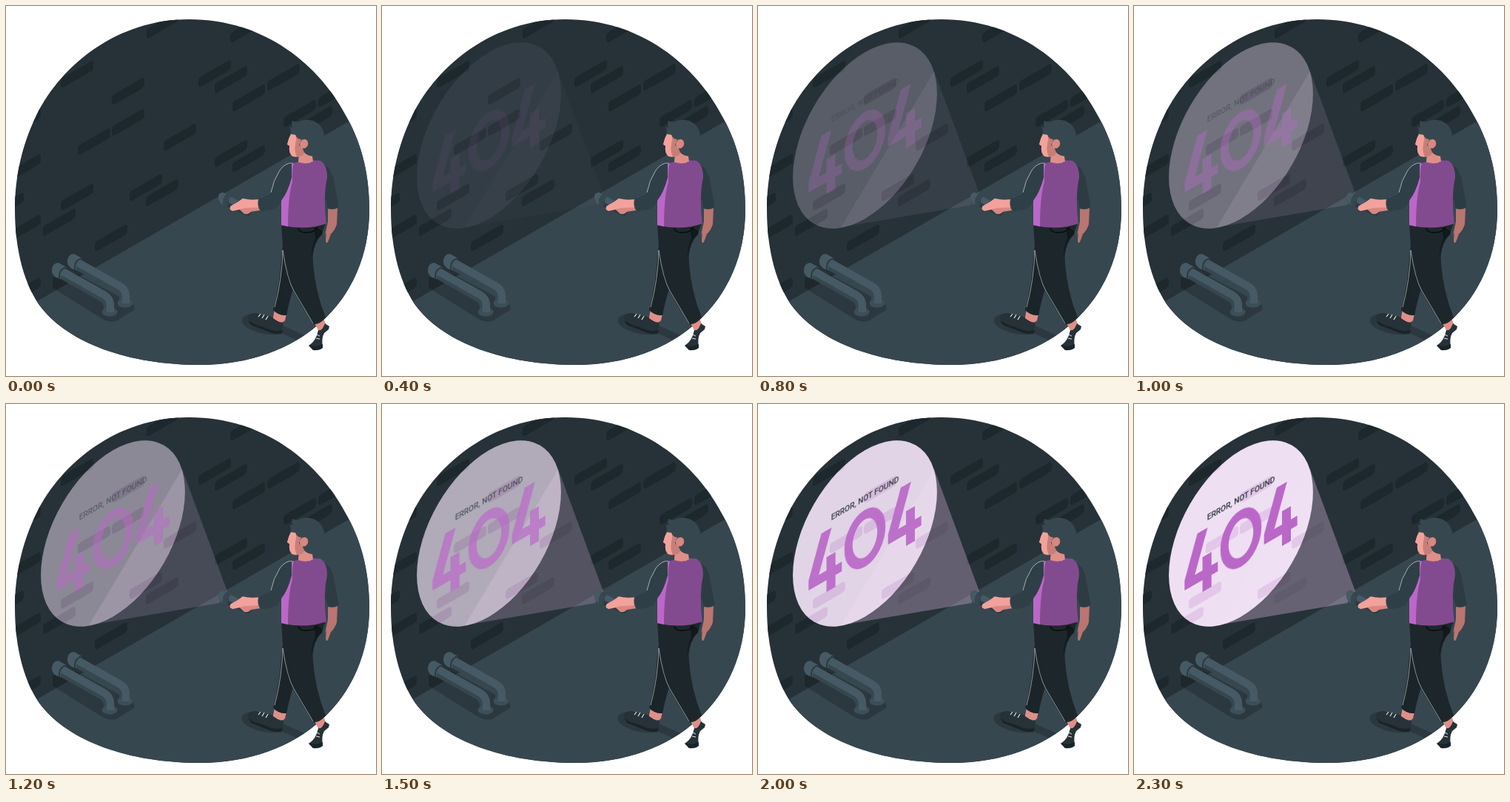
These frames come from a looping animation (500x500 px, 2400 ms). An HTML page:

```html
<!DOCTYPE html>
<html lang="en">
<head>
<meta charset="utf-8">
<title>Error, not found</title>
<style>
html, body { margin: 0; width: 100%; height: 100%; overflow: hidden; background: #fff; }
svg { display: block; width: 100%; height: 100%; }
text { font: 500 11.7px Roboto, Arial, sans-serif; }
</style>
</head>
<body>
<svg viewBox="0 0 500 500">
  <defs>
    <clipPath id="blob"><path d="M247 18C150 18 75 80 42 146C20 190 12 235 12 275C12 330 25 378 48 408C85 455 165 485 262 485C395 485 491 400 491 275C491 230 482 190 462 153C425 80 350 18 247 18Z"/></clipPath>
    <clipPath id="spot"><circle r="112.5" transform="matrix(.866 -.5 0 1 144.5 175)"/></clipPath>
    <g id="bricks"></g>
    <g id="pipe" fill="none" stroke-linejoin="round">
      <path d="M74 361L131 393Q139 398 139 406V415" stroke="#37474f" stroke-width="14"/>
      <ellipse cx="140" cy="416" rx="10.500" ry="6" fill="#2c3a41"/>
      <ellipse cx="140" cy="413.500" rx="10.500" ry="6" fill="#3c4f58"/>
      <path d="M75 358L132 390Q141 395 141 404V414" stroke="#455a64" stroke-width="10.500"/>
      <path d="M62 356Q63 347 71 347L82 353Q73 357 74 369L68 367Q61 363 62 356Z" fill="#455a64"/>
      <path d="M82 353Q71 355 72 369" stroke="#2c3a41" stroke-width="2"/>
    </g>
  </defs>

  <g clip-path="url(#blob)">
    <path d="M0 0H500V500H0Z" fill="#263238"/>
    <use href="#bricks" fill="#1d282d"/>
    <path d="M500 134.700L0 423.300V500H500Z" fill="#37474f"/>
    <g opacity=".2">
      <path d="M63 367V381L132 424Q146 430 155 422L173 411Q176 403 165 399L96 362Z"/>
      <path d="M319 422Q326 412 350 421L417 451L405 457L374 443Q352 447 332 438Q316 431 319 422Z"/>
    </g>
  </g>
  <use href="#pipe" x="21" y="-12"/>
  <use href="#pipe"/>

  <g id="light">
    <path class="lit" d="M238 88L299 253L288 269L112 299Z" fill="#f0c9f4" fill-opacity=".32"/>
    <g class="lit" clip-path="url(#spot)">
      <path d="M40 40H250V310H40Z" fill="#f0e1f4"/>
      <use href="#bricks" fill="#ba68c8" opacity=".2"/>
    </g>
    <g transform="matrix(.866 -.5 0 1 144.5 175)">
      <g class="lit" fill="#ba68c8" role="img" aria-label="404">
        <path id="four" d="M-68-34H-52L-72 20H-60V2H-46V20H-36V33H-46V49H-60V33H-88V20Z"/>
        <use href="#four" x="124"/>
        <ellipse cy="6.500" rx="25.700" ry="32" fill="none" stroke="#ba68c8" stroke-width="12.800"/>
      </g>
      <text class="lit" y="-44" text-anchor="middle" fill="#263238">ERROR, NOT FOUND</text>
    </g>
  </g>

  <g id="torch">
    <path d="M300 256L331 274Q333 280 328 284L298 271Z" fill="#2c3a41"/>
    <path d="M301 256L325 269L321 275L301 266Z" fill="#455a64"/>
    <path d="M287 258Q287 252 293 252L305 257Q299 261 299 273L292 269Q287 265 287 258Z" fill="#37474f"/>
    <path d="M287 258Q287 252 293 252L298 254Q292 258 293 269Q287 265 287 258Z" fill="#455a64"/>
  </g>

  <g id="walker">
    <path d="M428 214Q441 219 443 237L450 271Q445 277 435 274L427 244Z" fill="#2d3c43"/>
    <path d="M435 274Q443 276 448 273L447 295Q444 304 439 308L435 319Q432 322 432 315L433 306L431 310L435 291Z" fill="#b97570"/>

    <path d="M363 410L379 416L377 425Q371 431 360 426Z" fill="#e08f88"/>
    <path d="M327 418Q333 413 342 416L359 420Q366 427 375 428L373 442Q364 445 349 438L331 431Q326 426 327 418Z" fill="#263238"/>
    <path d="M328 425Q336 431 349 434Q362 441 374 438L373 442Q364 445 349 438L331 431Z" fill="#1a2428"/>
    <path d="M341 420L344 416M346 422L349 417M351 424L354 419" stroke="#e8e8e8" stroke-width="1.200"/>
    <path d="M416 427L429 421L433 433L423 440Z" fill="#e08f88"/>
    <path d="M422 438Q427 440 431 429L437 433L436 437L430 442Q426 449 428 460Q425 465 415 465L409 459Q419 453 422 438Z" fill="#263238"/>
    <path d="M409 458Q418 462 428 457V462Q423 466 415 465Z" fill="#1a2428"/>
    <path d="M420 444L424 446M419 449L424 450" stroke="#e8e8e8" stroke-width="1"/>

    <path d="M374 325L394 365Q384 392 379 418Q369 419 361 411Q371 371 372 340Z" fill="#1b2529"/>
    <path d="M375 332L398 362L389 386L381 368Z" fill="#070a0c"/>
    <path d="M372 293L432 291Q430 304 422 315Q413 329 415 348Q418 386 432 421Q424 431 415 430Q394 397 386 381Q376 350 374 325Z" fill="#1d272b"/>
    <path d="M416 299Q430 302 427 309Q417 316 415 329L412 343Q414 322 418 314Z" fill="#11191c"/>
    <path d="M395 300Q396 307 407 306Q417 306 421 299" fill="none" stroke="#080c0e" stroke-width="1.500"/>
    <path d="M374 330Q373 370 363 407M374 330Q380 370 389 385L415 429" fill="none" stroke="#dbe0e2" stroke-width=".6"/>

    <path d="M343 261Q330 263 320 260L313 265L304 270Q300 275 306 277L316 275L320 279Q324 284 331 277L344 275Z" fill="#f2a29b"/>
    <path d="M307 277L323 273L344 272V276L331 278Q326 284 321 279L316 275Z" fill="#d98781"/>

    <path d="M388 211Q378 211 371 220Q361 234 357 254L341 261Q339 271 344 277Q358 277 366 272Q378 258 386 238Z" fill="#2f3f47"/>
    <path d="M387 212Q377 212 370 222Q361 236 358 252" fill="none" stroke="#dbe0e2" stroke-width=".7"/>
    <path d="M386 213Q407 207 425 209Q434 215 434 231Q428 260 433 294Q405 304 372 296V263Q381 252 386 232Z" fill="#834b8f"/>
    <path d="M386 213L389 212Q386 222 387 237Q381 258 381 298L372 296V263Q381 252 386 232Z" fill="#ba68c8"/>

    <path d="M396 196H413L415 210Q407 215 395 211Z" fill="#e08f88"/>
    <path d="M386 171Q382 178 380 187L383 189Q382 199 387 203Q397 206 404 199L409 181L397 169Z" fill="#c77f79"/>
    <path d="M386 171Q382 178 380 187L383 189Q382 199 387 203L393 204Q389 195 391 187L393 173Z" fill="#f2a29b"/>
    <path d="M384 173Q386 167 383 163L388 164Q385 160 387 155Q393 158 398 155Q414 151 424 161Q434 173 429 189Q425 199 414 203Q403 202 401 193L396 188L399 180Q393 180 391 174Z" fill="#37474f"/>
    <path d="M397 188Q397 180 404 180Q409 181 408 188Q405 194 399 192Z" fill="#d98781"/>
  </g>
</svg>
<script>
const LOOP = 2400, STEP = 100;
const bricks = [
  [74, 98], [190, 31], [303, 37], [143, 121], [143, 163], [97, 189], [213, 183],
  [260, 97], [282, 105], [306, 130], [353, 102], [375, 151], [397, 159], [422, 124],
  [282, 205], [306, 212], [167, 251], [189, 258], [74, 264], [50, 298], [120, 319],
  [3, 163], [3, 224], [3, 306], [3, 391], [-20, 276]
];
document.getElementById("bricks").innerHTML = bricks.map(([x, y]) =>
  `<rect width="44" height="14" rx="4" transform="translate(${x} ${y}) skewY(-30)"/>`).join("");

const litParts = document.querySelectorAll(".lit");

// The torch warms up in steps, starting late and pausing once.
function brightness(time) {
  let t = Math.floor(time / STEP) * STEP;
  if (t < 400) return 0;
  if (t === 700) t = 600;
  return (1 - Math.cos(Math.PI * t / LOOP)) / 2;
}

// Each lit part fades on its own, so lettering blends with the spot beneath it.
const start = performance.now();
function render(now) {
  const level = brightness(Math.max(0, now - start) % LOOP);
  litParts.forEach(part => part.setAttribute("opacity", level));
  requestAnimationFrame(render);
}
render(start);
</script>
</body>
</html>
```
